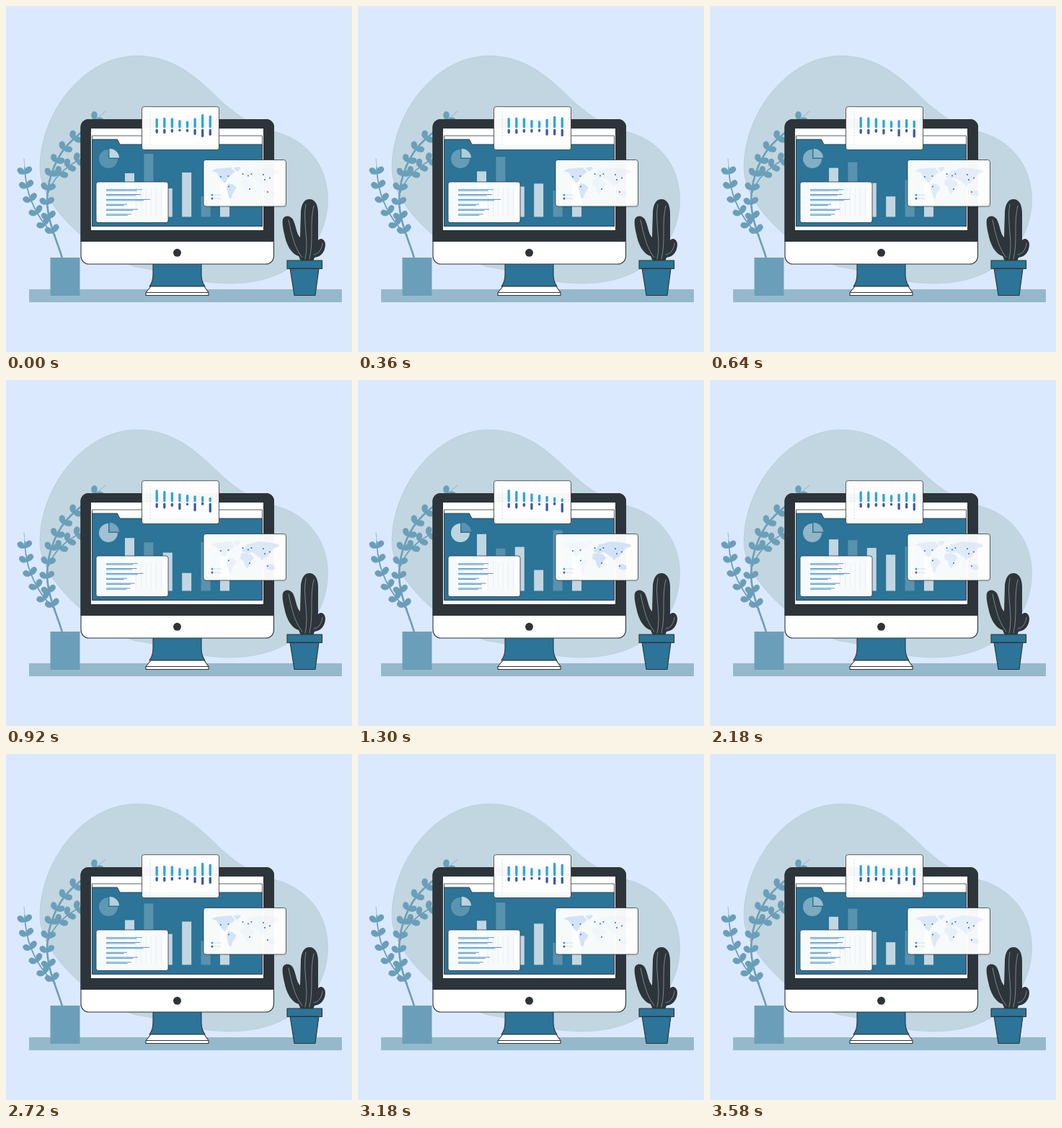
Animation, 480 px wide and 480 px high, one loop 3.6 s. Source, as an HTML page:

```html
<!DOCTYPE html>
<html lang="en">
<head>
<meta charset="utf-8">
<title>Dashboard</title>
<style>
  html, body { margin: 0; width: 100%; height: 100%; overflow: hidden; background: #dbe9ff; }
  svg { display: block; width: 100%; height: 100%; }
  .ink { stroke: #2d353a; stroke-width: 1.1; stroke-linejoin: round; }
  .thin { stroke-width: .8; }
  .line { fill: none; stroke-linecap: round; }
  .card { fill: #fff; fill-opacity: .96; stroke: #2d353a; stroke-width: .8; }
</style>
</head>
<body>
<svg viewBox="0 0 480 480">
  <path fill="#c1d6e0" stroke="#a9c0cb" stroke-width=".4" d="M182 69C240 69 275 110 300 133C325 155 345 167 372 174C410 183 446.500 215 446.500 268C446.500 325 405 385 310 385C260 385 225 368 180 362C125 345 47 280 47 225C47 148 108 69 182 69Z"/>
  <path fill="#95b9cb" d="M32 393H466V411H32Z"/>

  <g id="plant" class="line" stroke="#6b9fb9">
    <path fill="#6b9fb9" stroke="none" d="M61.500 349H102.500V402H61.500Z"/>
    <path stroke-width=".6" d="M124 158L138 146M26 224L25 212"/>
  </g>

  <!-- monitor -->
  <path class="ink" fill="#2c7498" d="M204 357H271V372C271 380 273 385 276 389H199C203 384 204 379 204 372Z"/>
  <path class="ink" fill="#fff" d="M201 389H275L281 397.500H194ZM194 397.500H281V401.500H194Z"/>
  <rect class="ink" x="104" y="157.500" width="267.500" height="200.500" rx="11" fill="#fff"/>
  <path fill="#2d353a" d="M103.500 327V168a11 11 0 0 1 11-11H361a11 11 0 0 1 11 11V327Z"/>
  <path fill="#fff" d="M118 170H357V311H118Z"/>
  <path class="ink thin" fill="#fff" d="M119.500 180H355.500V305.500H119.500Z"/>
  <path class="ink thin" fill="#2c7498" d="M119.500 185H154.500L158 192H355.500V305.500H119.500Z"/>
  <circle cx="237.500" cy="342.300" r="5.500" fill="#2d353a"/>
  <g fill="#c1d6e0">
    <path id="pieRest" d="M142 212V199A13 13 0 1 0 155 212Z"/>
    <path id="pieSlice" d="M143.500 210.500V198A13 13 0 0 1 157 210.500Z"/>
    <g id="columns"></g>
  </g>

  <!-- cactus -->
  <path fill="#2d353a" d="M409 354L406 347C396 344 389 332 386 316C384 307 383 300 384 296C386 290 394 290 398 296C402 303 403 317 408 321L409 285C410 274 414 268 421 268C429 268 433 276 433 288V325C436 321 442 323 443 330C443 341 437 348 428 349L426 354Z"/>
  <path class="line" stroke="#9aa9b0" stroke-width=".7" d="M415 351C421 325 411 300 416 275M421 351C427 325 421 300 427 277M411 349C402 338 397 322 392 297M427 345C434 344 438 338 439 329"/>
  <path class="ink" fill="#2c7498" d="M394 364H434L429 401.500H400ZM390 353H438.500V364.500H390Z"/>

  <rect class="card" x="188.500" y="139.700" width="107" height="59.800" rx="3"/>
  <path class="line" stroke="#c5d0da" stroke-width=".7" stroke-dasharray="1 3" d="M200 147V193"/>
  <g id="gauges" class="line" stroke-width="3.300"></g>

  <rect class="card" x="125" y="244" width="100" height="56.500" rx="3"/>
  <path fill="none" stroke="#eaedf0" stroke-width="40" stroke-dasharray=".8 6.200" d="M180 272H216"/>
  <g id="rows" fill="none" stroke-width=".9"></g>

  <rect class="card" x="274" y="213.500" width="114.500" height="64.500" rx="3"/>
  <g fill="#d3e2f6">
    <path id="west" d="M285 229l6-3 21-2 6 6-9 7-3 5-2 4-5-4-7-11zM316 224l8-1 2 2-5 5-3-2zM308 246l6 1 6 5-6 9-2 7-3-3-3-13z"/>
    <path id="east" d="M326 241l8-1 6 2 4 5-4 5-5 10-4-5-1-6-5-3zM327 239l1-5 4-1 2-5 6-1 10-3 14 1 14 3 1 3-7 2-7 9-4 5-3-1-2 5-4-5-10-7-7 1zM361 257l5-2 6 2 1 5-5 2-6-2z"/>
  </g>
  <g class="line" stroke-width="2.200">
    <path stroke="#2b7fc4" d="M298 237h0M308.500 236h0M309 250.500h0M328.500 233h0M336 235.500h0M340.500 233h0M357 234h0M359 241h0M366 238.500h0M338 254h0M363 258h0"/>
    <path stroke="#2ea5da" stroke-width="3" d="M286 262h0"/>
    <path stroke="#3a5ca8" stroke-width="3" d="M286 267h0"/>
    <path stroke="#b3c3d4" stroke-width=".7" stroke-dasharray="2 1.500" d="M289.500 262H298M289.500 267H298"/>
  </g>
</svg>
<script>
const LOOP = 3600, CYCLE = 3000;
const CYAN = '#2ea5da', NAVY = '#3a5ca8';
const tracks = [];
const $ = id => document.getElementById(id);

function add(parent, tag, attrs) {
  const el = document.createElementNS('http://www.w3.org/2000/svg', tag);
  for (const key in attrs) el.setAttribute(key, attrs[key]);
  return $(parent).appendChild(el);
}

// Eases from one value to another at the peak phase, then back again.
function animate(from, to, peak, apply) {
  tracks.push(phase => {
    const part = phase < peak ? phase / peak : (1 - phase) / (1 - peak);
    apply(from + (to - from) * (1 - Math.cos(Math.PI * part)) / 2);
  });
}

// Draws a stem with pairs of leaves spaced evenly along it.
function sprout(d, width, first, step) {
  const stem = add('plant', 'path', { d, 'stroke-width': width });
  for (let s = first; s < stem.getTotalLength(); s += step) {
    const p = stem.getPointAtLength(s), q = stem.getPointAtLength(s - 2);
    const heading = Math.atan2(p.y - q.y, p.x - q.x) * 180 / Math.PI;
    for (const turn of [-48, 48]) add('plant', 'path', {
      d: 'M0 0Q3-5 8-4.500Q13-3 12.500 0Q12 4 8 4Q3 4 0 0Z', fill: '#6b9fb9', stroke: 'none',
      transform: `translate(${p.x} ${p.y}) rotate(${heading + turn})`
    });
  }
}
sprout('M78 350C71 325 57 300 57 268C58 235 72 205 90 188C102 176 114 169 124 158', 2.6, 38, 20);
sprout('M68 318C50 303 34 275 29 250C27 238 26 230 26 224', 1.7, 19, 19.5);
sprout('M59 258C66 238 84 222 106 211', 1.5, 28, 15);

// Screen columns: top edge at rest, at its peak, phase of the peak
const columns = [
  [232, 213, .5], [205, 235, .5], [253, 227, .6], [231, 268, .27], [264, 206, .5], [245, 245, .5]
];
columns.forEach(([rest, high, peak], i) => {
  const faint = i === 1 || i === 4;
  const bar = add('columns', 'rect', { x: 165 + i * 26.4, width: 13, opacity: faint ? .3 : 1 });
  animate(rest, high, peak, top => {
    bar.setAttribute('y', top);
    bar.setAttribute('height', 292.5 - top);
  });
});

// Gauges: waves whose swing grows towards the right
for (let i = 0; i < 8; i++) {
  const x = 209.2 + i * 10.58;
  const upper = add('gauges', 'path', { stroke: CYAN });
  const lower = add('gauges', 'path', { stroke: NAVY });
  animate(156 + i * Math.cos((i - 3.6) * 1.2), 152 + 1.8 * i, .4,
    y => upper.setAttribute('d', `M${x} ${y + 1.5}V167.500`));
  animate(176.5 - .9 * i * Math.cos((i - 3) * Math.PI / 3), 177.5 - .9 * i * Math.cos(i * Math.PI), .35,
    y => lower.setAttribute('d', `M${x} 172.200V${y - 1.5}`));
}

// Text rows: longer ones shrink more
[50, 48, 61, 29, 44, 35].forEach((length, i) => {
  const y = 254.7 + i * 6.85;
  const cyan = add('rows', 'path', { stroke: CYAN });
  const navy = add('rows', 'path', { stroke: NAVY, opacity: .8 });
  const [long, short] = i % 3 ? [navy, cyan] : [cyan, navy];
  const lineY = new Map([[long, y], [short, y + 1.4]]);
  animate(length, length - Math.max(0, length - 30) * .4, .45, width => {
    long.setAttribute('d', `M139 ${lineY.get(long)}h${width}`);
    short.setAttribute('d', `M139 ${lineY.get(short)}h${width * .85}`);
  });
});

const fade = (id, from, to) => animate(from, to, .48, v => $(id).setAttribute('opacity', v));
fade('pieRest', .3, 1);
fade('pieSlice', 1, .3);
fade('west', 1, .15);
fade('east', .15, 1);

function draw() {
  const phase = performance.now() % LOOP % CYCLE / CYCLE;
  for (const track of tracks) track(phase);
  requestAnimationFrame(draw);
}
draw();
</script>
</body>
</html>
```
